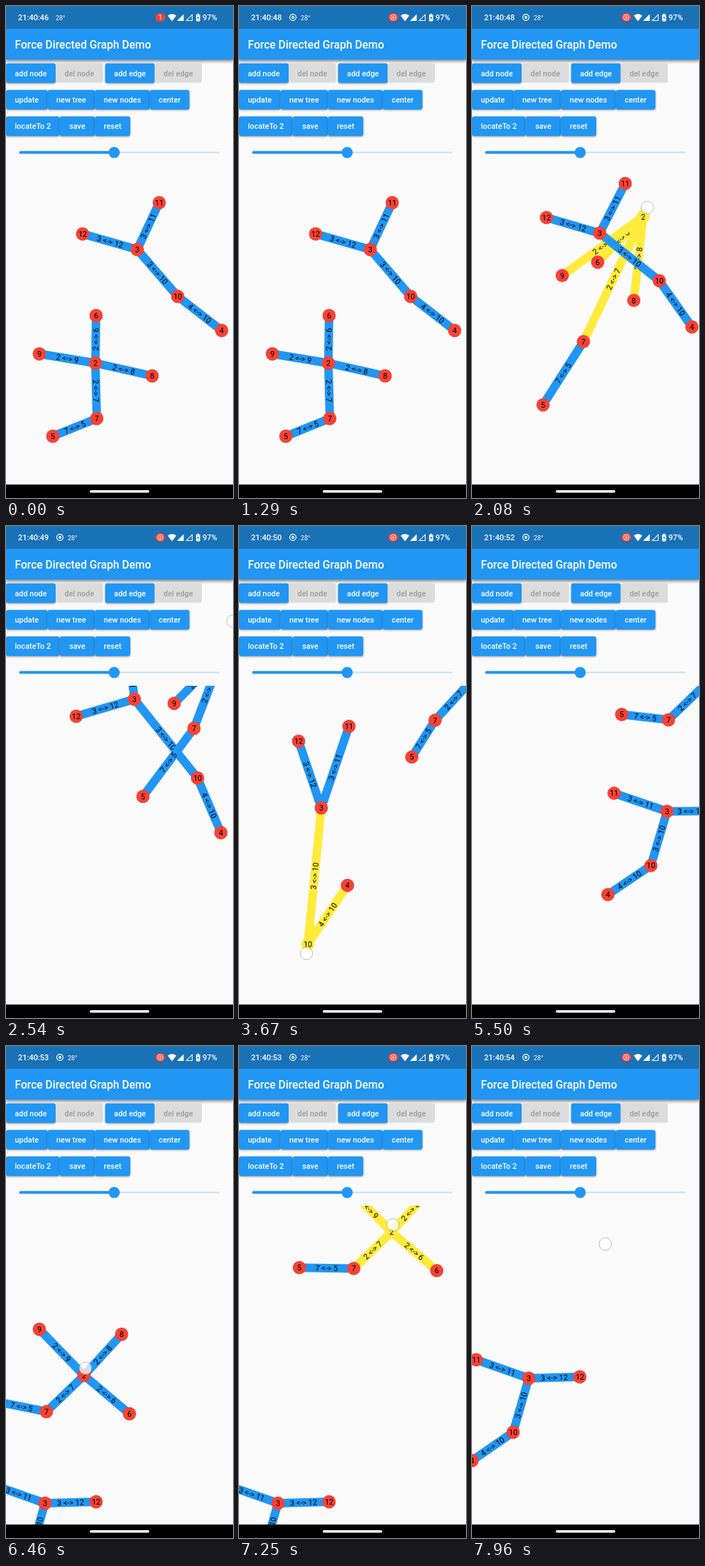
These frames come from a looping animation (320 by 693 pixels, 8 s). An HTML page with a canvas:

```html
<!DOCTYPE html>
<html lang="en">
<head>
<meta charset="utf-8">
<title>Force Directed Graph Demo</title>
<style>
html, body { margin: 0; width: 100%; height: 100%; overflow: hidden; background: #fafafa; }
canvas { display: block; width: 320px; height: 693px; }
</style>
</head>
<body>
<canvas id="stage"></canvas>
<script>
const W = 320, H = 693, LOOP = 8000;
const BLUE = '#2196f3', DARK = '#1971b6', PAGE = '#fafafa';
const RED = '#f44336', PICKED = '#ffeb3b', WHITE = '#fff';
const FONT = 'Roboto, "Open Sans", sans-serif';
const canvas = document.getElementById('stage');
const ratio = Math.max(1, window.devicePixelRatio || 1);
canvas.width = W * ratio;
canvas.height = H * ratio;
const c = canvas.getContext('2d');

// Key points (x, y) of each node; a node rests once its points run out
const clusters = [
  {
    times: [1710, 2080, 2540, 4000, 4700, 5700],
    nodes: {
      2: [126, 503, 241, 297, 304, 183, 330, 222],
      5: [66, 606, 100, 562, 193, 381, 247, 322, 247, 322, 207, 259],
      6: [127, 436, 177, 361, 258, 202, 394, 276],
      7: [128, 581, 157, 473, 265, 285, 277, 273],
      8: [206, 521, 228, 415, 318, 205, 383, 164],
      9: [47, 490, 127, 380, 237, 250, 267, 157]
    }
  },
  {
    times: [1710, 2080, 2540, 3670, 4670, 5600],
    nodes: {
      3: [185, 343, 180, 320, 181, 244, 116, 397, 270, 400, 275, 402],
      4: [304, 457, 310, 452, 303, 432, 153, 506, 86, 554, 195, 518],
      10: [242, 409, 264, 387, 270, 355, 97, 589, 205, 500, 253, 478],
      11: [216, 277, 216, 250, 173, 175, 155, 282, 173, 391, 201, 376],
      12: [108, 321, 105, 298, 99, 268, 84, 303, 165, 440, 347, 400]
    }
  }
];
const edges = [[2, 6], [2, 7], [2, 8], [2, 9], [3, 10], [3, 11], [3, 12], [4, 10], [7, 5]];

// The finger runs ahead of the node it drags, by `lead` growing into `pull`
const drags = [
  { node: 2, start: 1670, end: 2530, lead: [3, -2], pull: [16, -49] },
  { node: 10, start: 3050, end: 3920, lead: [-2, 13], pull: [-2, 13] },
  { node: 3, start: 4250, end: 4900, lead: [8, -5], pull: [8, -5] },
  { node: 2, start: 6420, end: 7300, lead: [2, -10], pull: [2, -10] }
];
const SLOP = 60; // a press becomes a drag after this long
const pans = [
  { start: 6080, end: 6400, grab: [290, 290], by: [-220, 242] },
  { start: 7720, end: 7960, grab: [163, 455], by: [25, -176] }
];
// Last drag: node 2 leads its cluster, each step down the tree follows later
const tow = { start: 6480, span: 700, lag: 90, by: [105, -202] };
const depth = { 2: 0, 5: 2, 6: 1, 7: 1, 8: 1, 9: 1 };

const clamp = u => Math.min(1, Math.max(0, u));
const ease = u => (u = clamp(u)) * u * (3 - 2 * u);
const add = (p, q, k = 1) => [p[0] + q[0] * k, p[1] + q[1] * k];
const panned = (p, t) => ease((t - p.start) / (p.end - p.start));

// Smooth path through the keys that never overshoots a turning point
function along(times, xy, t, axis) {
  const n = xy.length / 2, v = i => xy[2 * i + axis];
  if (t <= times[0]) return v(0);
  if (t >= times[n - 1]) return v(n - 1);
  let i = 0;
  while (t > times[i + 1]) i++;
  const slope = k => (v(k + 1) - v(k)) / (times[k + 1] - times[k]);
  const tangent = k => {
    if (k === 0 || k === n - 1) return 0;
    const a = slope(k - 1), b = slope(k);
    return a * b <= 0 ? 0 : 2 * a * b / (a + b);
  };
  const h = times[i + 1] - times[i], u = (t - times[i]) / h, w = 1 - u;
  return w * w * (1 + 2 * u) * v(i) + u * w * w * h * tangent(i) +
    u * u * (3 - 2 * u) * v(i + 1) - u * u * w * h * tangent(i + 1);
}

function layout(t) {
  const shift = pans.reduce((s, p) => add(s, p.by, panned(p, t)), [0, 0]);
  const at = {};
  for (const { times, nodes } of clusters) {
    for (const id in nodes) {
      const p = [0, 1].map(axis => along(times, nodes[id], t, axis));
      at[id] = add(p, shift);
      if (id in depth) {
        const u = (t - tow.start - tow.lag * depth[id]) / tow.span;
        at[id] = add(at[id], tow.by, ease(u));
      }
    }
  }
  return at;
}

function rect(x, y, w, h, fill) {
  c.fillStyle = fill;
  c.fillRect(x, y, w, h);
}
function rounded(x, y, w, h, r, fill) {
  c.fillStyle = fill;
  c.beginPath();
  c.roundRect(x, y, w, h, r);
  c.fill();
}
function disc(x, y, r, fill) {
  c.fillStyle = fill;
  c.beginPath();
  c.arc(x, y, r, 0, 7);
  c.fill();
}
function ring(x, y, r, width, color) {
  c.strokeStyle = color;
  c.lineWidth = width;
  c.beginPath();
  c.arc(x, y, r, 0, 7);
  c.stroke();
}
function poly(points, fill) {
  c.beginPath();
  points.forEach(p => c.lineTo(...p));
  c.closePath();
  c.fillStyle = fill;
  c.fill();
}
function text(s, x, y, size, color, align = 'left', weight = 500) {
  c.font = `${weight} ${size}px ${FONT}`;
  c.textAlign = align;
  c.fillStyle = color;
  c.fillText(s, x, y);
}
const label = (s, x, y) => text(s, x, y + 3.9, 10.9, '#000', 'center', 400);
function shadow(blur, dy, alpha) {
  c.shadowBlur = blur * ratio;
  c.shadowOffsetY = dy * ratio;
  c.shadowColor = `rgba(0,0,0,${alpha})`;
}

function statusBar(t) {
  rect(0, 0, W, 32, DARK);
  text('21:40:' + (46 + Math.floor((t + 710) / 1000)), 17, 20, 11, WHITE);
  const recording = t >= 790;
  if (recording) {
    ring(76, 16, 4.4, 1.2, WHITE);
    disc(76, 16, 1.9, WHITE);
  }
  text('28°', recording ? 87 : 70, 19.5, 9, WHITE, 'left', 400);

  rounded(210.5, 10, 14, 12, 6, RED);
  if (t < 300) {
    text('1', 217.5, 19.3, 9, WHITE, 'center');
  } else {
    ring(217.5, 16, 3.8, 1, WHITE);
    disc(217.5, 16, 1.6, WHITE);
  }
  c.fillStyle = WHITE;
  c.beginPath();
  c.moveTo(234, 21.5);
  c.lineTo(228, 13.5);
  c.quadraticCurveTo(234, 9, 240, 13.5);
  c.fill();
  poly([[241, 21], [250.5, 21], [250.5, 11.5]], WHITE);
  poly([[253, 21], [263, 21], [263, 11]], WHITE);
  poly([[255.4, 20], [262, 20], [262, 13.4]], DARK);
  rounded(268, 12, 5.6, 9.5, 1, WHITE);
  rect(269.6, 10.8, 2.4, 1.5, WHITE);
  poly([[271.3, 13.5], [269.3, 17], [270.6, 17], [270.3, 20], [272.4, 16], [271.1, 16]], DARK);
  text('97%', 277, 20, 11, WHITE);
}

// Buttons flow from the left; '|' leaves a gap
function buttonRow(names, y) {
  let x = 0;
  for (const name of names) {
    if (name === '|') {
      x += 3.1;
      continue;
    }
    const enabled = !name.startsWith('del');
    c.font = `500 10.9px ${FONT}`;
    const w = Math.max(49.8, c.measureText(name).width + 24.9);
    if (enabled) shadow(2.5, 1.2, 0.4);
    rounded(x, y, w, 27.5, 3, enabled ? BLUE : '#dcdcdc');
    shadow(0, 0, 0);
    text(name, x + w / 2, y + 17.7, 10.9, enabled ? WHITE : '#9b9b9b', 'center');
    x += w;
  }
}

function controls() {
  shadow(4, 2, 0.45);
  rect(0, 32, W, 43.5, BLUE);
  shadow(0, 0, 0);
  text('Force Directed Graph Demo', 12.5, 59.7, 15.6, WHITE);
  [
    ['add node', 'del node', '|', 'add edge', 'del edge'],
    ['update', 'new tree', 'new nodes', 'center'],
    ['locateTo 2', 'save', 'reset']
  ].forEach((names, i) => buttonRow(names, 80.8 + 37.35 * i));
  rounded(19, 205.2, 282, 2, 1, '#c6e2f8');
  rounded(18.5, 204.3, 134, 4, 2, BLUE);
  disc(152.5, 206.3, 7.9, BLUE);
}

function graph(at, t) {
  const drag = drags.find(d => t >= d.start + SLOP && t < d.end);
  const held = drag ? drag.node : 0;
  c.save();
  c.beginPath();
  c.rect(0, 225, W, 449);
  c.clip();
  for (const [a, b] of edges) {
    const [x1, y1] = at[a], [x2, y2] = at[b];
    c.strokeStyle = a === held || b === held ? PICKED : BLUE;
    c.lineWidth = 12;
    c.beginPath();
    c.moveTo(x1, y1);
    c.lineTo(x2, y2);
    c.stroke();
    c.save();
    c.translate((x1 + x2) / 2, (y1 + y2) / 2);
    c.rotate(Math.atan((y2 - y1) / (x2 - x1 || 1e-6)));
    label(`${a} <-> ${b}`, 0, 0);
    c.restore();
  }
  for (const id in at) {
    const [x, y] = at[id];
    disc(x, y, 9.4, +id === held ? PICKED : RED);
    label(id, x, y);
  }
  c.restore();
}

function finger(at, t) {
  const touching = g => t >= g.start && t <= g.end + 50;
  const drag = drags.find(touching), pan = pans.find(touching);
  let p;
  if (drag) {
    const u = clamp((t - drag.start) / (drag.end - drag.start)) ** 2;
    p = add(add(at[drag.node], drag.lead, 1 - u), drag.pull, u);
  } else if (pan) {
    p = add(pan.grab, pan.by, panned(pan, t));
  } else return;
  disc(...p, 8.8, 'rgba(255,255,255,.72)');
  ring(...p, 8.8, 1, 'rgba(130,130,130,.5)');
}

function draw(t) {
  const at = layout(t);
  c.setTransform(ratio, 0, 0, ratio, 0, 0);
  rect(0, 0, W, H, PAGE);
  graph(at, t);
  controls();
  statusBar(t);
  rect(0, 674, W, 19, '#000');
  rounded(118, 682, 84, 3.4, 1.7, WHITE);
  finger(at, t);
}

const start = performance.now();
function tick() {
  draw((performance.now() - start) % LOOP);
  requestAnimationFrame(tick);
}
tick();
</script>
</body>
</html>
```
